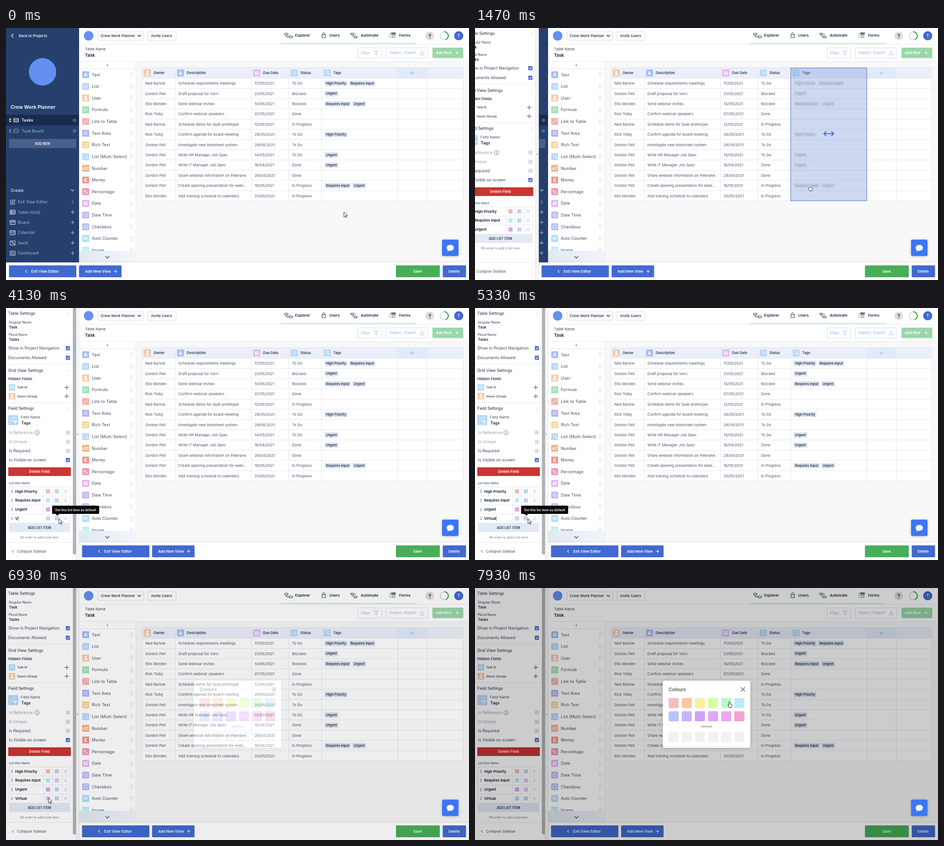
An HTML page for the animation above (8000 ms loop, 1014x552 px).

```html
<!DOCTYPE html>
<html lang="en">
<head>
<meta charset="utf-8">
<title>Task table editor</title>
<style>
html, body { margin: 0; height: 100%; overflow: hidden; background: #fff }
svg { display: block; width: 100vw; height: 100vh; font-family: Inter, "Liberation Sans", sans-serif; white-space: pre }
</style>
</head>
<body>
<svg id="stage" viewBox="0 0 1014 552"></svg>
<script>
const BLUE = '#4169d1', INK = '#1f2a44', GREY = '#4a5368', LINE = '#e3e6ee', PALE = '#a9bae8';

// y is the middle of the capitals
const T = (x, y, s, size = 8, weight = 400, fill = GREY, anchor = 'start', extra = '') =>
  `<text x="${x}" y="${y + size * .364}" font-size="${size}" font-weight="${weight}" fill="${fill}" text-anchor="${anchor}" ${extra}>${s}</text>`;
const R = (x, y, w, h, fill, r = 0, stroke = 'none', extra = '') =>
  `<rect x="${x}" y="${y}" width="${w}" height="${h}" rx="${r}" fill="${fill}" stroke="${stroke}" ${extra}/>`;
const P = (d, stroke, w = 1, fill = 'none') =>
  `<path d="${d}" stroke="${stroke}" stroke-width="${w}" fill="${fill}"/>`;
const C = (x, y, r, fill, stroke = 'none', w = 1) =>
  `<circle cx="${x}" cy="${y}" r="${r}" fill="${fill}" stroke="${stroke}" stroke-width="${w}"/>`;
const G = (id, body) => `<g id="${id}">${body}</g>`;
const plus = (x, y, r, c, w = 1) => P(`M${x - r} ${y}h${2 * r}M${x} ${y - r}v${2 * r}`, c, w);
const cross = (x, y, r, c, w = 1) => P(`M${x - r} ${y - r}l${2 * r} ${2 * r}m0 ${-2 * r}l${-2 * r} ${2 * r}`, c, w);
const down = (x, y, r, c, w = 1) => P(`M${x - r} ${y - r / 2}l${r} ${r} ${r} ${-r}`, c, w);
const left = (x, y, r, c, w = 1) => P(`M${x + r / 2} ${y - r}l${-r} ${r} ${r} ${r}`, c, w);
const sorter = (x, y, r, c) => P(`M${x - r} ${y - 1}l${r} ${-r * 1.4} ${r} ${r * 1.4}zM${x - r} ${y + 1}l${r} ${r * 1.4} ${r} ${-r * 1.4}z`, 'none', 0, c);
const eye = (x, y, c) => P(`M${x - 4.5} ${y}q4.5-6 9 0q-4.5 6-9 0z`, c, .8) + C(x, y, 1.5, 'none', c, .8);

// name: [colour, letters or a path in a 15px box]
const FIELDS = {
  'Text': ['#a2bdf6', 'A'],
  'List': ['#b5d8fb', 'M3 4.5h1.5m1.5 0h6M3 7.5h1.5m1.5 0h6M3 10.5h1.5m1.5 0h6'],
  'User': ['#f8c8a2', 'M5.2 5a2.3 2.3 0 1 0 4.6 0a2.3 2.3 0 1 0-4.6 0M3.5 12c0-4.5 8-4.5 8 0z', '#fff'],
  'Formula': ['#a0e2b4', '<tspan font-style="italic" font-weight="400">fx</tspan>'],
  'Link to Table': ['#f5afa9', 'M6 9l3-3M7 5l1.5-1.5a2 2 0 0 1 3 3L10 8M8 10l-1.5 1.5a2 2 0 0 1-3-3L5 7'],
  'Text Area': ['#b0b0f8', 'M3 4.5h9M3 7.5h9M3 10.5h9'],
  'Rich Text': ['#f8d58f', 'M3.5 4h3M8 4h4M3.5 6.5h3M8 6.5h4M3 9h9M3 11.5h9'],
  'List (Multi-Select)': ['#b5d8fb', 'M3 4h1.5m1.5 0h6M3 7h1.5m1.5 0h3M3 10h1.5m1.5 0h2M9 8l4 1.5-2 .8-.8 2z'],
  'Number': ['#f3b184', '42'],
  'Money': ['#f1968f', '£'],
  'Percentage': ['#f095bb', '%'],
  'Date': ['#e5b0f8', 'M3.5 4h8v7.5h-8zM3.5 6.5h8M3.5 9h8M6 4v7.5M9 4v7.5'],
  'Date Time': ['#c0b6fb', 'M3.5 7.5a4 4 0 1 0 8 0a4 4 0 1 0-8 0M7.5 5v2.7l2 1'],
  'Checkbox': ['#b0bdf6', 'M3.5 3.5h8v8h-8zM5.5 7.5l1.5 1.5 2.8-3'],
  'Auto Counter': ['#b0dcf8', 'ID'],
  'Image': ['#b5ecf5', 'M3 4h9v7h-9zM3 10l3-3 3 3 2-2']
};
function fieldIcon(name, x, y, size = 15) {
  const [colour, mark, fill = 'none'] = FIELDS[name];
  const body = mark[0] === 'M' ? P(mark, '#fff', .9, fill)
    : T(7.5, 7.5, mark, mark.length === 1 ? 11 : 9, 700, '#fff', 'middle');
  return `<g transform="translate(${x - size / 2} ${y - size / 2}) scale(${size / 15})">${R(0, 0, 15, 15, colour, 1)}${body}</g>`;
}

function nav() {
  const entries = [
    ['Exit View Editor', 'M15 377h-5v9h9v-4M13 383l1-3 5-4 1.5 1.5-4.5 4.5z'],
    ['Table (Grid)', 'M9 399h11v9h-11zM9 402h11M9 405h11M12.5 399v9'],
    ['Board', 'M9 421.5h11v9h-11zM9 424h11M12.5 424v5M16.5 424v3'],
    ['Calendar', 'M9 444h11v9h-11zM9 447h11M11 450h2m1 0h2m1 0h2M11 443v2M18 443v2'],
    ['Gantt', 'M9 466.5h11v9h-11zM11 469h4M13 471h4M15 473h4'],
    ['Dashboard', 'M9 489h11v9h-11zM11 492h4M11 495h7M16.5 492h2']];
  return R(0, 0, 160, 514, '#263f6c') + R(0, 190, 160, 23.5, '#192c50') +
    P('M0 35.5h160M0 157.5h160M0 340.5h160', '#1f3560') +
    left(14, 17, 4, '#fff', 1.3) + T(28, 17, 'Back to Projects', 8, 600, '#e8edf7') +
    C(80, 96, 30, '#638ff0') +
    T(10, 173.5, 'Crew Work Planner', 10.6, 600, '#fff') +
    [['Tasks', 202, '#fff'], ['Task Board', 225.5, '#8b9bba']].map(([s, y, c], i) =>
      sorter(9, y, 2.6, c) + R(16.5, y - 4, 11, 8, 'none', 1, c) +
      P(i ? `M18.5 ${y - 2}v4m3-4v3m3-3v4` : `M17 ${y - 1.5}h10m-10 3h10`, c) +
      T(34, y, s, 9, 600, c) + eye(150, y, '#8b9bba')).join('') +
    R(6.5, 243, 147.5, 20, '#4a5f89', 1) + T(80, 253, 'ADD NEW', 6.9, 600, '#fff', 'middle') +
    T(10, 355.5, 'Create', 9, 500, '#e4eaf5') + down(146, 355.5, 3.5, '#d5deee', 1.2) +
    entries.map(([s, d], i) => {
      const y = 381 + i * 22.4;
      return P(d, '#f0f4fb') + T(26, y, s, 8.9, 400, '#a9b6cf') +
        (i ? plus(146, y, 4, '#b4c0d8', 1.1) : P('M144 377l4 4-4 4', '#b4c0d8'));
    }).join('');
}

function header() {
  const tabs = [
    [633, 'Explorer', 'M610.5 11.5h7v4h-7zM620.5 17.5h7v4h-7zM614 16v3.5h6'],
    [708, 'Users', 'M692 15h8v6h-8zM693.5 15v-2a2.5 2.5 0 0 1 5 0v2'],
    [777, 'Automate', 'M755 11.5h7v3h-7zM762 18.5h7v3h-7zM757 17h5M765 13v3'],
    [861, 'Forms', 'M840 12h2m2 0h9M840 16h2m2 0h9M840 20h2m2 0h9M844 10.5h9v3h-9z']];
  return R(160, 0, 854, 74, '#fff') + P('M160 35.5h854M160 73.5h854', '#e8e9ee') +
    C(181, 17, 10.5, '#638ff0') +
    R(201.5, 8, 100, 19, '#fff', 2, '#d7d9e0') + T(207.5, 17.5, 'Crew Work Planner', 8.2, 500, INK) + down(292, 17, 3.5, INK, 1.5) +
    R(311, 8, 61.5, 19, '#fff', 2, '#d7d9e0') + T(318, 17.5, 'Invite Users', 8.1, 500, INK) +
    R(602, 33, 297, 2.2, '#c6ecd1') +
    tabs.map(([x, s, d]) => P(d, INK) + T(x, 16.5, s, 8.2, 600, INK)).join('') +
    C(928, 17, 9.5, '#dedede') + T(928, 17.5, '?', 12, 700, '#444', 'middle') +
    C(960, 17, 8.7, 'none', '#dadde0', 2.4) + P('M960 8.3a8.7 8.7 0 0 1 3 16.9', '#3fae5c', 2.4) +
    C(991.5, 17, 10, BLUE) + T(991.5, 17, 'T', 8.5, 600, '#fff', 'middle') +
    T(173, 46.5, 'Table Name', 8.1, 400, '#3a4358') + T(173, 59.5, 'Task', 9.5, 600, '#111827') +
    R(771, 43.5, 52, 22.5, '#fff', 1, '#d0daf4') + T(777.5, 54.5, 'Filter', 8.3, 500, PALE) + P('M806 50h9l-3.5 4.5v4.5l-2-1v-3.5z', PALE) +
    R(833, 43.5, 91, 22.5, '#fff', 1, '#d0daf4') + T(840, 54.5, 'Import / Export', 8.15, 500, PALE) + P('M911.5 49.5v6m-2.5-2.5l2.5 2.5 2.5-2.5M907 56v3h9v-3', PALE) +
    R(934, 43, 67.5, 23, '#9bd7aa', 1) + T(941, 54.5, 'Add Row', 8.1, 600, '#fff') + plus(988, 54.5, 3.8, '#fff', 1.1);
}

function fieldList() {
  let s = R(160, 74, 124.5, 440, '#fff') + P('M284.5 74v440M160 89.5h124', '#e4e6eb') + left(222, 81.5, 2.5, '#333');
  Object.keys(FIELDS).forEach((name, i) => {
    const y = 102.3 + i * 25.63;
    s += fieldIcon(name, 174.5, y) + T(188, y, name, 8.9, 400, '#3f4860', 'start', 'letter-spacing=".15"');
    for (let k = 0; k < 6; k++) s += R(272 + k % 2 * 3.8, y - 4.8 + (k >> 1) * 3.8, 2, 2, '#d3d6dc');
  });
  return s + R(160, 488, 124, 26, 'url(#fade)') + down(222, 502, 4.2, '#222', 1.3);
}

const COLS = [298, 370.5, 537.5, 619.5, 691.5, 858, 922.5, 1001];
const rowY = i => 121.3 + i * 22.4;
const [ned, gordon, ellis, rick] = ['Ned Barlow', 'Gordon Pell', 'Ellis Morden', 'Rick Tolby'];
const HIGH = 'High Priority', INPUT = 'Requires Input', URGENT = 'Urgent';
const TASKS = [
  [ned, 'Schedule requirements meetings', '17/05/2021', 'To Do', HIGH, INPUT],
  [gordon, 'Draft proposal for Vorn', '21/05/2021', 'Blocked', URGENT],
  [ellis, 'Send webinar invites', '14/05/2021', 'Blocked', INPUT, URGENT],
  [rick, 'Confirm webinar speakers', '07/05/2021', 'Done'],
  [ned, 'Schedule demo for Quib prototype', '12/05/2021', 'In Progress'],
  [rick, 'Confirm agenda for board meeting', '26/05/2021', 'To Do', HIGH],
  [gordon, 'Investigate new timesheet system', '28/05/2021', 'To Do'],
  [gordon, 'Write HR Manager Job Spec', '14/05/2021', 'To Do', URGENT],
  [gordon, 'Write IT Manager Job Spec', '16/04/2021', 'Done', URGENT],
  [gordon, 'Share webinar information on Peerlane', '28/04/2021', 'Done'],
  [gordon, 'Create opening presentation for webi...', '18/05/2021', 'In Progress', INPUT, URGENT],
  [ellis, 'Add training schedule to calendars', '20/05/2021', 'In Progress']];
const TAG_WIDTH = { [HIGH]: 50.5, [INPUT]: 57.5, [URGENT]: 30.5 };

function table() {
  const heads = [['Owner', 'User'], ['Description', 'Text'], ['Due Date', 'Date'], ['Status', 'List'], ['Tags', 'List (Multi-Select)']];
  let s = R(284.5, 74, 730, 440, '#f8f8f9') + R(298, 87, 703, 291.5, '#fff') +
    R(298, 87, 703, 23, '#ebeff9') + R(858, 87, 64.5, 23, '#e1ebf9');
  for (let i = 0; i < 13; i++) s += P(`M298 ${110.1 + i * 22.37}h703`, LINE);
  s += COLS.map(x => P(`M${x} 87v291.5`, LINE)).join('') + P('M298 87h703', '#d9dfef') + plus(890, 98.5, 5, '#8fabea', 1);
  heads.forEach(([name, kind], i) => {
    s += fieldIcon(kind, COLS[i] + 11.7, 98.5) + T(COLS[i] + 25.2, 98.5, name, 7.6, 600, '#303b57');
  });
  let tags = '';
  TASKS.forEach(([who, what, due, status, ...list], i) => {
    const y = rowY(i);
    s += [who, what, due, status].map((v, k) => T(COLS[k] + 7, y, v, 8.1)).join('');
    let x = 697.5;
    for (const tag of list) {
      tags += R(x, y - 6.3, TAG_WIDTH[tag], 12.6, '#e3e9f5', 2) + T(x + TAG_WIDTH[tag] / 2, y, tag, 7.4, 600, '#27324d', 'middle');
      x += TAG_WIDTH[tag] + 3.3;
    }
  });
  return s + G('tags', tags) +
    G('hover', R(691.5, 87.5, 166.5, 291, '#6f8fd0', 0, '#4f74c8', 'fill-opacity=".34"') +
      P('M764 231.5h21.5M769 226.5l-5 5 5 5M780.5 226.5l5 5-5 5', BLUE, 2)) +
    G('drag', R(298, 87, 703, 291.5, 'none', 1, BLUE, 'stroke-width="1.3"') +
      R(298, 392, 345.5, 31.5, '#dfe8f6', 1, '#9fb5e4') + T(422, 408, 'Drop Field to Hide', 9, 600, BLUE) +
      eye(513.5, 408, BLUE) + C(513.5, 408, 2.5, 'none', BLUE) + P('M508.5 403.5l10 9', BLUE, 1.2) +
      R(656.5, 392, 344.5, 31.5, '#fbe4e3', 1, '#efb2af') + T(776, 408, 'Drop Field to Delete', 9, 600, '#c5322f') +
      P('M871 404.5h10M874 404.5v-1.5h4v1.5M872 404.5v8.5h8v-8.5M874.7 406.5v4.5M877.3 406.5v4.5', '#c5322f', 1.2));
}

const button = (x, w, fill, x2, label) => R(x, 520, w, 26, fill, 1.5) + T(x2, 533, label, 8, 600, '#fff');
function footer() {
  return R(0, 513.5, 1014, 39, '#fff') + R(0, 511.5, 1014, 2, '#000', 0, 'none', 'opacity=".05"') +
    G('actions', button(6.5, 147.5, BLUE, 55, 'Exit View Editor') + left(44, 533, 2.8, '#fff', 1.1) +
      button(160, 93, BLUE, 173, 'Add New View') + plus(240, 533, 3.8, '#fff', 1.1)) +
    button(854, 96, '#48ae58', 892, 'Save') + button(956.5, 51, BLUE, 969, 'Delete');
}

function tick(x, y, on) {
  return R(x - 4.5, y - 4.5, 9, 9, on ? BLUE : '#dcdde0', 1) + (on ? P(`M${x - 2.5} ${y}l2 2 3.3-4`, '#fff', 1.2) : '');
}

// added: a fourth list item is present and the scrollbar narrows the pane
function pane(added) {
  const e = added ? -6.5 : 0, rows = added ? 4 : 3, end = 392 + rows * 19.8;
  const label = (y, s, c = '#3d4761', x = 5) => T(x, y, s, 8.9, 400, c);
  let s = [['Table Settings', 12], ['Grid View Settings', 136.5], ['Field Settings', 220]].map(([h, y]) =>
      T(5, y, h, 8.8, 400, INK) + down(144 + e, y, 3, '#ccd0da', .9)).join('') +
    T(6, 31, 'Singular Name', 7.1, 500) + T(6.5, 42, 'Task', 8, 600, INK) +
    T(6, 58.5, 'Plural Name', 7.1, 500) + T(6.5, 69.5, 'Tasks', 8, 600, INK) +
    label(88, 'Show in Project Navigation') + tick(142 + e, 88, 1) +
    label(109, 'Documents Allowed') + tick(142 + e, 109, 1) +
    P('M0 123.5h153M0 207.5h153M0 513.5h153', '#e6e8ed') +
    T(5, 155.5, 'Hidden Fields', 8, 600, '#333d55') +
    [['Task ID', 'Auto Counter', 174], ['Owner (Group)', 'User', 193.3]].map(([n, k, y]) =>
      fieldIcon(k, 13, y, 14) + T(24.5, y, n, 6.2, 600) + plus(139.5 + e, y, 5, '#333b4d', 1)).join('') +
    fieldIcon('List (Multi-Select)', 16, 245.5, 22) + T(32.5, 239.5, 'Field Name', 8) + T(33.5, 252, 'Tags', 8.8, 600, INK) +
    [['Is Reference', '#9a9fab'], ['Is Unique', '#9a9fab'], ['Is Required'], ['Is Visible on screen']].map(([n, c], i) =>
      label(273 + i * 20, n, c, 6.5) + tick(142 + e, 273 + i * 20, i === 3)).join('') +
    C(68, 273, 4.8, 'none', '#555d70', .8) + P('M68 272v3.5M68 270v1', '#555d70') +
    R(5, 349, 143.5 + e, 19, '#c93632', 1) + T(76.5 + e / 2, 358.5, 'Delete Field', 8, 600, '#fff', 'middle') +
    T(6.5, 383.5, 'List Item Name', 6.4, 500);
  [[HIGH, '#f4b9b9'], [INPUT, '#b9e9fb'], [URGENT, '#dd9ef8'], ['', '#c5d1ee']].slice(0, rows).forEach(([n, c], i) => {
    const y = 401.7 + i * 19.8;
    s += sorter(13, y, 2.2, '#7d9be0') + T(20, y, n, 8, 600, '#111827', 'start', n ? '' : 'id="typed"') +
      R(94 + e, y - 4.5, 9, 9, c, 1) + R(113.3 + e, y - 4.5, 9, 9, '#c5d1ee', 1) + cross(137 + e, y, 4.2, '#9fb7e8');
  });
  for (let i = 0; i <= rows; i++) s += P(`M6.5 ${392 + i * 19.8}h${140.5 + e}`, LINE);
  s += [6.5, 89 + e, 108 + e, 127.5 + e, 147 + e].map(x => P(`M${x} 392V${end}`, LINE)).join('') +
    R(6.5, end, 140.5 + e, 19.5, '#e3eaf6', 0, 'none', added ? '' : 'id="addItem"') +
    T(76.5 + e / 2, end + 10, 'ADD LIST ITEM', 7, 600, '#27324d', 'middle') +
    T(76.5 + e / 2, end + 31, 'Hit enter to add a list item', 7, 500, '#858c9b', 'middle');
  return s + (added ? R(146.5, 0, 7, 539.5, '#b1b1b3') + R(0, 456.2, .8, 10, '#111827', 0, 'none', 'id="caret"') : '');
}

function settings() {
  return R(0, 0, 160, 552, '#fff') + R(153.5, 0, 6.5, 552, '#f7f7f9') + P('M153.5 0v552M160 0v552', '#dfe1e7') +
    left(156.8, 276.5, 1.8, '#555', .9) + left(15, 533, 3, '#444', 1) + T(24, 533, 'Collapse Sidebar', 8.1) +
    G('paneBefore', pane(false)) + G('paneAfter', pane(true));
}

const tip = (id, x, w, point, s) => G(id, R(x, 433, w, 18, '#050505', 2) +
  P(`M${point - 4} 451h8l-4 4z`, 'none', 0, '#050505') + T(x + w / 2, 442, s, 7.1, 600, '#fff', 'middle'));

function dialog() {
  const shades = ['#f5bcbd', '#f7c8a0', '#fbf0a0', '#d9fb9f', '#b8fbc5', '#bdeafc',
    '#b9c2fb', '#c3b6fb', '#cfa2f7', '#e3a3fb', '#eba8ec', '#f2a3cd'];
  let s = R(411, 203, 192, 147, '#fff', 4, 'none', 'filter="url(#shadow)"') +
    T(424, 222, 'Colours', 10.1, 600, '#555') + cross(587, 222, 4.5, '#555', 1.1) + R(494, 301.5, 26, 4, '#c8c8c8', 2);
  for (let i = 0; i < 18; i++)
    s += R(424 + i % 6 * 28.8, [241, 270, 315.5][i / 6 | 0], 22, 22, shades[i] || '#f1f1f1', 2);
  return R(0, 0, 1014, 552, '#000', 0, 'none', 'opacity=".2"') + s;
}

document.getElementById('stage').innerHTML =
  `<defs><linearGradient id="fade"><stop stop-color="#dfeaec"/><stop offset=".5" stop-color="#e9eef8"/><stop offset="1" stop-color="#f2f5fa"/></linearGradient>
  <filter id="shadow"><feDropShadow dx="0" dy="1" stdDeviation="3" flood-opacity=".2"/></filter></defs>` +
  table() + header() + fieldList() + nav() + footer() + G('settings', settings()) +
  tip('tipDefault', 101, 103, 112.5, 'Set this list item as default') +
  tip('tipColour', 82, 109, 93.5, 'Set a colour on your list item') +
  G('dialog', dialog()) +
  R(955, 463.5, 36, 36, '#3b76f6', 3, 'none', 'filter="url(#shadow)"') +
  P('M973 475c10.5 0 10.5 13 0 13q-1.5 0-2.5-.3l-4 2 1-3.5c-5-4-2-11.2 5.5-11.2z', 'none', 0, '#fff') +
  G('cursor', P('', '#111', .9, '#fff'));

const $ = id => document.getElementById(id);
const show = (id, on) => $(id).style.display = on ? '' : 'none';
const shift = (id, x, y = 0) => $(id).setAttribute('transform', `translate(${x} ${y})`);
const clamp = v => Math.min(1, Math.max(0, v));
const shape = $('cursor').firstChild;
const SHAPES = {
  arrow: 'M0 0v11l2.6-2.4 1.7 4 1.9-.8-1.7-3.9h3.5z',
  hand: 'M-1 .8c0-1.2 2-1.2 2 0v4l4 .9c1 .3 1.2 1 1 2l-.6 4.8h-5.4l-3.2-4.4c-.6-1 .6-1.7 1.3-.9l.9 1z',
  grab: 'M-1 5c-1-2 0-3 1.4-2.4c.4-1.6 1.8-1.6 2.4-.6 1-.8 2-.4 2.4.4 1-.4 2 0 2 1.2v2.4l-1.2 3h-5z'
};
// time, x, y of the pointer
const PATH = [[667, 740, 403], [1000, 732, 348], [1800, 732, 348], [2000, 682, 400], [2200, 500, 478], [2400, 300, 499],
  [2667, 144, 480], [3067, 116, 461.5], [6267, 116, 461.5], [6733, 93, 460], [7267, 93, 460], [7600, 330, 340], [7933, 557, 249]];
const KEYS = [3333, 4133, 4667, 4800, 4933, 5067, 5200, 5333];

function pointer(t) {
  const i = PATH.findIndex(p => p[0] > t);
  if (i < 1) return (i ? PATH[PATH.length - 1] : PATH[0]).slice(1);
  const [t0, x0, y0] = PATH[i - 1], [t1, x1, y1] = PATH[i], u = (t - t0) / (t1 - t0);
  return [x0 + (x1 - x0) * u, y0 + (y1 - y0) * u];
}

function draw(now) {
  // the picture advances 15 times a second
  const t = Math.floor((now % 8000 + 6) * .015) / .015;
  const [x, y] = pointer(t);
  const hover = t < 2600 && x > 691 && y < 378, drag = t > 1060 && t < 1260;
  const added = t >= 3333, opened = t > 6860;
  show('hover', hover);
  show('drag', drag);
  $('tags').style.opacity = hover ? .4 : 1;

  // the settings pane enters from the left and pushes the footer buttons along
  const slide = 1 - (1 - clamp((t - 1230) / 370)) ** 2;
  show('settings', slide > 0);
  shift('settings', 160 * (slide - 1));
  shift('actions', 160 * slide);

  show('paneBefore', !added);
  show('paneAfter', added);
  const overAdd = !added && x < 147 && y > 451 && y < 471;
  $('addItem').setAttribute('fill', overAdd ? '#d3def2' : '#e3eaf6');
  show('tipDefault', added && !opened && x > 101);
  show('tipColour', added && !opened && x <= 101);

  const pressed = KEYS.filter(k => t >= k);
  $('typed').textContent = 'Virtual'.slice(0, Math.max(0, pressed.length - 1));
  if (added) $('caret').setAttribute('x', 20.2 + $('typed').getComputedTextLength());
  show('caret', added && t < 6730 && (t - pressed[pressed.length - 1]) % 1066 < 530);

  $('dialog').style.opacity = clamp((t - 6867) / 200);
  const hand = t > 7850 || overAdd || added && !opened && x < 99;
  shape.setAttribute('d', SHAPES[hover ? 'grab' : hand ? 'hand' : 'arrow']);
  shift('cursor', x, y);
}
let start;
function loop(now) {
  start ??= now;
  draw(now - start);
  requestAnimationFrame(loop);
}
draw(0);
requestAnimationFrame(loop);
</script>
</body>
</html>
```
